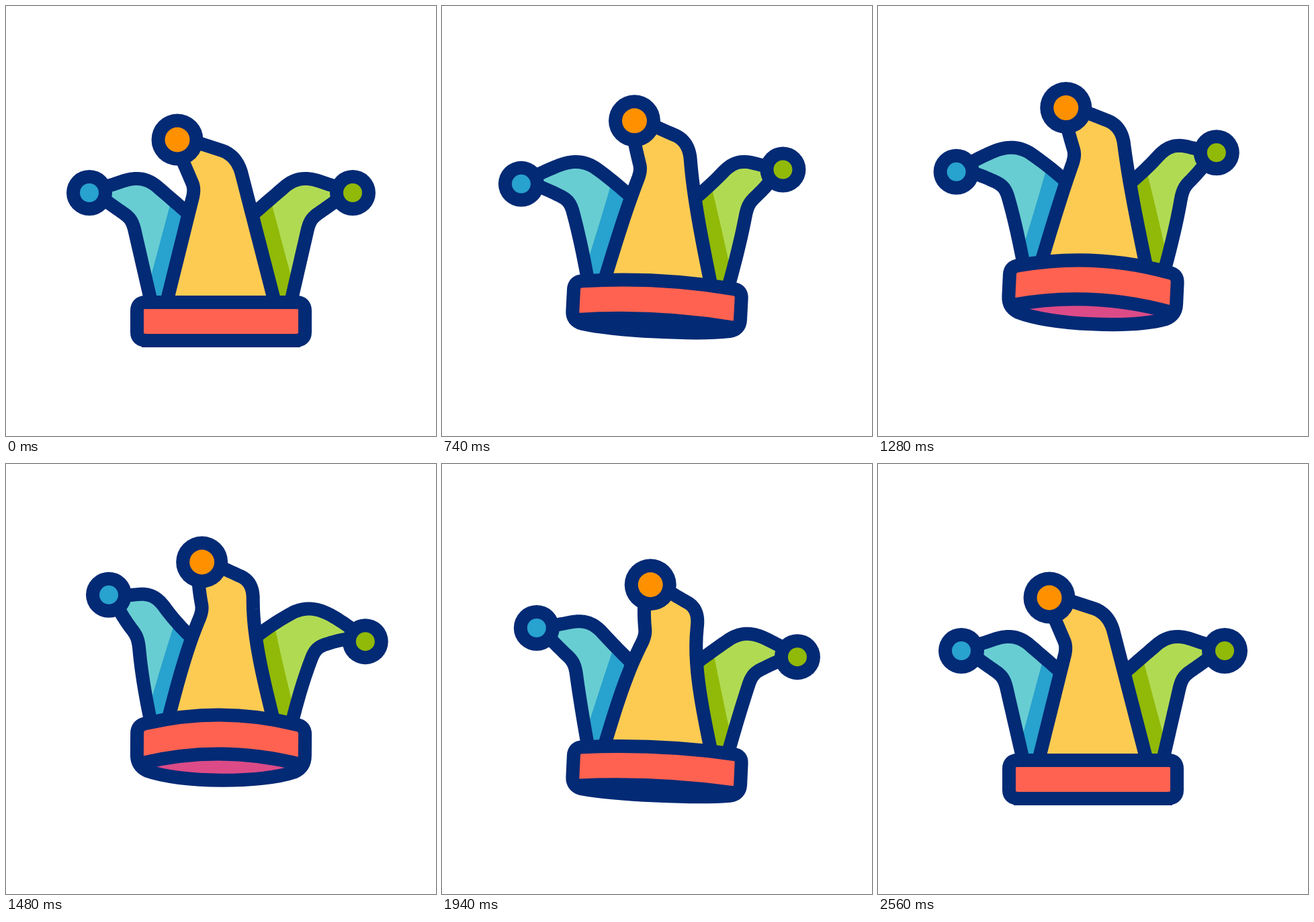
Write an HTML page with a canvas that moves like this. It is 640 px wide and 640 px high and loops after 3 s.

```html
<!DOCTYPE html>
<html lang="en">
<head>
<meta charset="utf-8">
<title>Jester hat</title>
<style>
  html, body { margin: 0; width: 100%; height: 100%; overflow: hidden; background: #fff; }
  canvas { display: block; width: 640px; height: 640px; }
</style>
</head>
<body>
<canvas id="stage" width="640" height="640"></canvas>
<script>
const ctx = document.getElementById('stage').getContext('2d');
const LOOP = 3000, START = 220, END = 2560, PERIOD = 549;
const CX = 320, CY = 469.5;
const NAVY = '#032a75';

// Outlines at rest: two numbers make a line, six a cubic curve.
const midEdge = [[238, 445], [277, 288], [280, 277, 280, 270, 277, 263], [262, 228],
  [275, 200], [318, 214], [337, 219, 347, 234, 351, 251], [401, 445]];
const sideEdge = [[217, 445], [191, 332], [188, 321, 185, 316, 177, 310], [140, 284],
  [140, 272], [176, 260], [196, 254, 210, 257, 224, 268], [290, 325]];
const sideShade = [[246, 289], [214, 409], [224, 445], [260, 445], [288, 327]];

function ease(t, from, to) {
  const u = Math.min(1, Math.max(0, (t - from) / (to - from)));
  return u * u * (3 - 2 * u);
}

// Leans left from rest, then swings to and fro until it dies out.
// "zero" is the time of the first pass through the middle.
function swing(t, size, zero) {
  const trough = zero - PERIOD / 4;
  if (t < trough) return -size * ease(t, START, trough);
  const u = Math.min(1, Math.max(0, (t - 1300) / (END - 1300)));
  return size * (1 - u * u) * Math.sin(2 * Math.PI * (t - zero) / PERIOD);
}

// Dip, jump, hover, fall and settle.
const lift = t => 20 * ease(t, START, 430) - 48 * ease(t, 430, 800) - 24 * ease(t, 700, 1500)
  + 71 * ease(t, 1720, 2140) - 19 * ease(t, 2140, 2400);
const tilt = t => 0.65 * ease(t, 500, 860) + 0.39 * ease(t, 700, 1500) - 1.04 * ease(t, 1720, 2100);

function sample(segments) {
  const mix = (u, a, b, c, d) =>
    (1 - u) ** 3 * a + 3 * u * (1 - u) ** 2 * b + 3 * u * u * (1 - u) * c + u ** 3 * d;
  const out = [segments[0]];
  for (const s of segments.slice(1)) {
    const [x0, y0] = out[out.length - 1];
    const [x3, y3] = s.slice(-2);
    const [x1, y1, x2, y2] = s.length === 6 ? s
      : [x0 + (x3 - x0) / 3, y0 + (y3 - y0) / 3, x0 + (x3 - x0) * 2 / 3, y0 + (y3 - y0) * 2 / 3];
    for (let i = 1; i <= 14; i++) {
      out.push([mix(i / 14, x0, x1, x2, x3), mix(i / 14, y0, y1, y2, y3)]);
    }
  }
  return out;
}

const mirror = pts => pts.map(([x, y]) => [2 * CX - x, y]);
const mid = sample(midEdge), left = sample(sideEdge), right = mirror(left);
const leftShade = sample(sideShade), rightShade = mirror(leftShade);

// How far a point follows the tip of its horn: 0 at the band, 1 at the ball.
const midReach = (x, y) => Math.max(0, (CY - y) / 270.5) ** 2.7;
const sideReach = (x, y) =>
  Math.max(0, (Math.abs(x - CX) - 90) / 212 + (CY - y) / 383) ** 2;

function bender(dy, base, tip, reach, stretch) {
  return ([x, y]) => {
    const w = reach(x, y);
    const a = (base + (tip - base) * w) * Math.PI / 180;
    const k = 1 + (stretch - 1) * w ** 4;
    const px = (x - CX) * k, py = (y - CY) * k;
    return [CX + px * Math.cos(a) - py * Math.sin(a),
      CY + dy + px * Math.sin(a) + py * Math.cos(a)];
  };
}

function trace(pts) {
  ctx.beginPath();
  pts.forEach(([x, y]) => ctx.lineTo(x, y));
}

function fill(color) {
  ctx.fillStyle = color;
  ctx.fill();
}

function horn(bend, edge, color, shade, shadeColor) {
  const pts = edge.map(bend);
  trace(shade ? [...pts, bend([edge[0][0] < CX ? 260 : 380, 445])] : pts);
  fill(color);
  if (shade) {
    trace(shade.map(bend));
    fill(shadeColor);
  }
  trace(pts);
  ctx.stroke();
}

function ball([x, y], r, color) {
  for (const [radius, c] of [[r, NAVY], [r - 20, color]]) {
    ctx.beginPath();
    ctx.arc(x, y, radius, 0, 7);
    fill(c);
  }
}

function band(dy, angle, p) {
  const w = 125, h = 28.5, up = 28 * p;
  ctx.save();
  ctx.translate(CX, CY + dy);
  ctx.rotate(angle * Math.PI / 180);

  const rim = new Path2D();
  rim.moveTo(-w, -16);
  rim.quadraticCurveTo(-w, -h, -112, -h - 2 * p);
  rim.quadraticCurveTo(0, -h - up, 112, -h - 2 * p);
  rim.quadraticCurveTo(w, -h, w, -16);
  rim.lineTo(w, 16);
  rim.quadraticCurveTo(w, h + 4 * p, 110, h + 11 * p);
  rim.bezierCurveTo(60, h + 28 * p, -60, h + 28 * p, -110, h + 11 * p);
  rim.quadraticCurveTo(-w, h + 4 * p, -w, 16);
  rim.closePath();
  ctx.fillStyle = '#dc4b87';
  ctx.fill(rim);

  ctx.beginPath();
  ctx.moveTo(-120, -h);
  ctx.quadraticCurveTo(0, -h - up, 120, -h);
  ctx.lineTo(120, h);
  ctx.quadraticCurveTo(0, h - up, -120, h);
  fill('#ff6250');

  ctx.stroke(rim);
  ctx.beginPath();
  ctx.moveTo(-118, h);
  ctx.quadraticCurveTo(0, h - up, 118, h);
  ctx.stroke();
  ctx.restore();
}

function draw(t) {
  const dy = lift(t), p = tilt(t);
  // The swing travels from the band to the tall horn, then to the side horns.
  const rock = swing(t, 4, 667), lean = swing(t, 15.5, 703), sway = swing(t, 9.5, 766);
  const bendL = bender(dy, rock, sway, sideReach, 1 + 0.003 * sway - 0.01 * p);
  const bendR = bender(dy, rock, sway, sideReach, 1 - 0.003 * sway - 0.01 * p);
  const bendM = bender(dy, rock, lean, midReach, 1 + 0.0045 * Math.min(0, lean) - 0.018 * p);

  ctx.fillStyle = '#fff';
  ctx.fillRect(0, 0, 640, 640);
  ctx.strokeStyle = NAVY;
  ctx.lineWidth = 20;
  ctx.lineJoin = 'round';

  horn(bendL, left, '#68cdd2', leftShade, '#28a2ce');
  ball(bendL([124, 278]), 34, '#28a2ce');
  horn(bendR, right, '#b1da53', rightShade, '#91b908');
  ball(bendR([516, 278]), 34, '#91b908');
  horn(bendM, mid, '#fdcb52');
  ball(bendM([255, 199]), 38.5, '#ff9100');
  band(dy, rock, p);
}

function loop() {
  draw(performance.now() % LOOP);
  requestAnimationFrame(loop);
}
loop();
</script>
</body>
</html>
```
